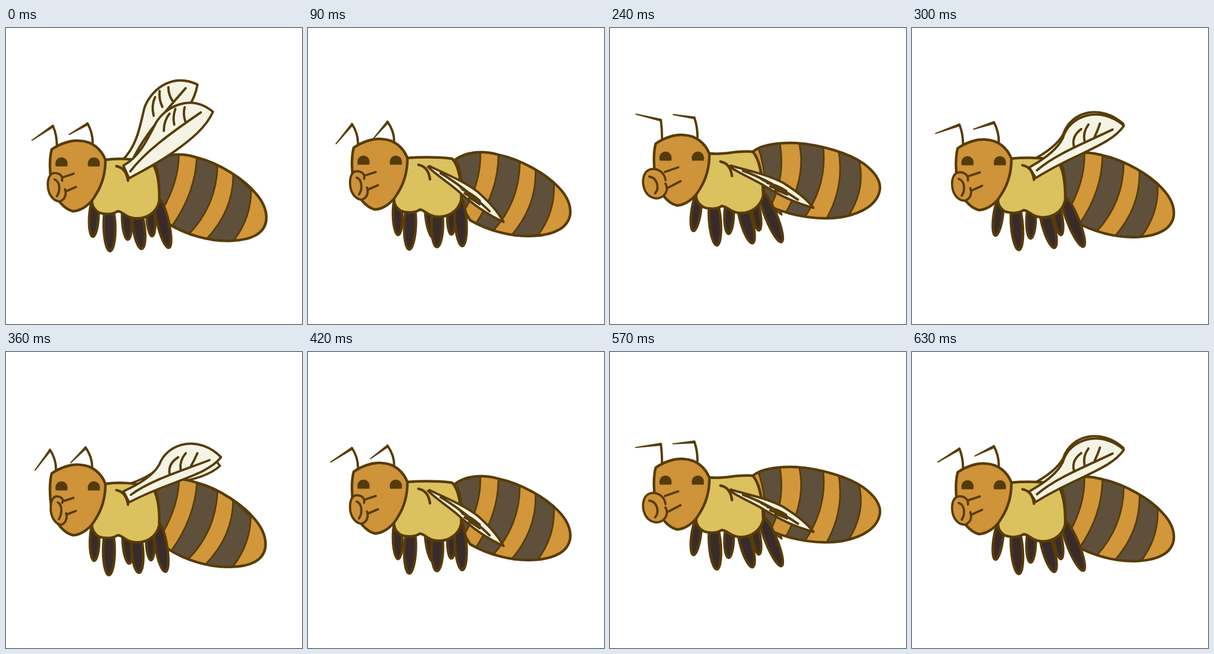
An HTML page with a canvas that plays this animation: 512 px wide and 512 px high, repeating every 660 ms.

```html
<!DOCTYPE html>
<html lang="en">
<head>
<meta charset="utf-8">
<title>Flying bee</title>
<style>
  html, body { margin: 0; height: 100%; overflow: hidden; background: #fff; }
  canvas { display: block; }
</style>
</head>
<body>
<canvas id="stage" width="512" height="512"></canvas>
<script>
const ctx = document.getElementById('stage').getContext('2d');
const LOOP = 660, BEAT = 330, STEP = 30;
const INK = '#573c08', HEAD = '#cf933a', ORANGE = '#d2973a', STRIPE = '#5f503c',
      YELLOW = '#dcc15f', WING = '#f5f4e4', LEG = '#3a2b2b', EYE = '#543c0a';
const RAD = Math.PI / 180;

// Body shapes as [raised, lowered] pairs
const ABDOMEN = [
  'M247,214 C262,202 290,198 322,199 C365,202 412,216 438,234 C457,248 468,262 467,278 C464,304 438,320 402,327 C362,333 318,326 282,311 C264,290 252,250 247,214Z',
  'M256,232 C272,219 300,214 330,224 C370,234 412,262 432,286 C446,302 452,318 450,334 C446,356 424,367 390,368 C352,370 310,357 280,338 C262,310 256,270 256,232Z'
];
const BANDS = [
  'M256,206 Q272,250 266,296 L280,304 Q303,255 294,200Z M326,195 Q342,255 302,323 L335,330 Q378,268 368,200Z M395,210 Q407,275 372,334 L409,330 Q444,280 430,226Z',
  'M256,230 Q270,260 264,312 L272,312 Q300,262 299,215Z M330,222 Q328,285 286,344 L315,358 Q364,308 366,238Z M393,252 Q394,315 346,366 L392,370 Q424,330 424,280Z'
];
const THORAX = [
  'M172,217 C200,220 220,211 247,214 C258,226 264,255 265,290 C260,312 240,321 224,320 C208,319 203,308 193,308 C186,313 172,314 162,310 C151,304 147,294 150,284 L172,217Z',
  'M172,228 C200,224 225,228 250,231 C262,242 266,270 265,300 C260,322 240,331 222,329 C205,328 203,317 193,317 C184,323 170,323 160,319 C150,312 147,302 150,292 L172,228Z'
];
const FACE = 'M79,210 C95,199 113,194 127,195 C150,196 165,210 172,228 C172,252 166,272 155,289 C146,305 131,316 116,317 C100,313 85,296 79,272 C75,250 75,225 79,210Z';
// Snout: [relaxed, stretched]
const SNOUT = [
  'M97,264 C99,254 90,250 82,251 C73,254 71,266 73,279 C76,293 85,300 93,300 C102,297 105,288 102,279 M88,291 C94,282 94,266 84,262 M99,258 L117,252 M105,282 L121,275',
  'M96,273 C94,258 80,251 68,255 C56,260 55,278 60,290 C66,304 80,307 88,303 C98,298 101,288 96,279 M78,296 C86,287 82,269 68,267 M95,259 L118,251 M101,286 L122,275'
];

// Legs: root x, root y, tip x, tip y, half width, swing
const LEGS = [
  [248, 300, 253, 361, 8, 5], [207, 300, 211, 367, 9, -6], [154, 292, 150, 362, 9, -6],
  [178, 300, 180, 387, 11, 5], [224, 303, 235, 383, 11, 12], [261, 292, 282, 381, 11, 15]
];

// Each wing shape is stored relative to the shoulder, turned so the tip lies on the x axis
const SHOULDER = [205, 245], FAR_SHOULDER = [205, 235];
function wing(tipX, tipY, path) {
  const angle = Math.atan2(tipY - SHOULDER[1], tipX - SHOULDER[0]);
  const c = Math.cos(angle), s = Math.sin(angle);
  const local = path.replace(/([\d.]+),([\d.]+)/g, (_, px, py) => {
    const x = px - SHOULDER[0], y = py - SHOULDER[1];
    return `${(x * c + y * s).toFixed(2)},${(y * c - x * s).toFixed(2)}`;
  });
  return { angle, path: local };
}
const up = wing(358, 145, 'M203,238 C232,222 246,190 260,163 C275,138 318,112 358,145 C346,172 320,193 292,213 C266,232 238,246 213,260Z M215,248 C240,215 280,185 337,146 M273,178 Q273,160 283,148 M291,167 Q288,153 293,140 M310,161 Q306,149 309,137');
const level = wing(372, 182, 'M203,241 C232,228 254,214 265,195 C280,155 335,144 372,182 C355,203 325,213 292,226 C265,236 238,247 213,260Z M216,247 C250,222 300,207 352,187 M283,211 Q280,193 298,182 M302,203 Q300,188 311,175 M320,197 Q326,187 331,175');
const down = wing(186, 421, 'M191,235 C188,270 190,290 165,315 C130,345 135,395 186,421 C200,400 207,365 213,330 C215,300 216,260 210,246Z M202,263 C194,295 187,350 181,408 M190,328 Q172,330 163,347 M187,350 Q167,352 158,367 M184,374 Q172,378 163,389');
const edge = wing(352, 311, 'M207,240 C225,252 245,260 262,270 C290,288 320,303 352,311 C335,290 315,278 300,268 C270,252 235,246 209,238Z M230,247 C255,256 285,270 325,297 M272,268 Q290,272 305,282 M277,274 Q292,279 307,286 M286,280 Q296,283 306,288');

const BODY_KEYS = [0, 30, 150, 240, 300, 330];
const WING_KEYS = [0, 30, 90, 150, 240, 300, 330];
const WING_SHAPES = [up, level, edge, down, edge, level, up];
const FEELER_KEYS = [0, 150, 240, 360, 480, 570, 630, 660];

const lerp = (a, b, k) => a + (b - a) * k;

function span(keys, t) {
  let i = 0;
  while (t >= keys[i + 1]) i++;
  return [i, (t - keys[i]) / (keys[i + 1] - keys[i])];
}

function track(keys, values, t) {
  const [i, k] = span(keys, t);
  return lerp(values[i], values[i + 1], k);
}

function blend(a, b, k) {
  const number = /-?\d+(\.\d+)?/g, ends = b.match(number);
  let i = 0;
  return a.replace(number, v => lerp(+v, +ends[i++], k).toFixed(2));
}

function draw(path, fill, width = 4.5) {
  const p = typeof path === 'string' ? new Path2D(path) : path;
  if (fill) { ctx.fillStyle = fill; ctx.fill(p); }
  ctx.lineWidth = width;
  ctx.stroke(p);
}

function drawWing(shoulder, shape, angle, scale = 1) {
  ctx.save();
  ctx.translate(...shoulder);
  ctx.rotate(angle);
  ctx.scale(scale, scale);
  draw(shape, WING, 4);
  ctx.restore();
}

function drawAbdomen(droop) {
  const outline = new Path2D(blend(...ABDOMEN, droop));
  ctx.save();
  ctx.clip(outline);
  ctx.fillStyle = ORANGE;
  ctx.fillRect(0, 0, 512, 512);
  draw(blend(...BANDS, droop), STRIPE, 2.8);
  ctx.restore();
  draw(outline);
}

function drawLeg([rootX, rootY, tipX, tipY, half, reach], swing) {
  const dx = tipX + reach * swing - rootX, dy = tipY - rootY;
  const leg = new Path2D();
  leg.ellipse(rootX + dx / 2, rootY + dy / 2, Math.hypot(dx, dy) / 2 - 1, half - 1,
    Math.atan2(dy, dx), 0, 7);
  draw(leg, LEG);
}

function drawFeeler(baseX, elbowX, elbowY, length, angle) {
  const tipX = elbowX - length * Math.cos(angle * RAD);
  const tipY = elbowY + length * Math.sin(angle * RAD);
  draw(`M${baseX},${elbowY + 34} Q${baseX},${elbowY + 16} ${elbowX},${elbowY}`, null, 4);
  draw(`M${elbowX},${elbowY - 1} L${tipX},${tipY} L${elbowX + 1},${elbowY + 2}Z`, INK, 2);
}

function drawEye(x, open) {
  ctx.save();
  ctx.translate(x, 239.5);
  ctx.scale(1, open);
  ctx.fillStyle = EYE;
  ctx.fill(new Path2D('M-10,0 C-15,-21 15,-21 10,0Z'));
  ctx.restore();
}

function render(now) {
  const t = Math.floor(now % LOOP / STEP) * STEP, beat = t % BEAT;
  const body = values => track(BODY_KEYS, values, beat);
  const flap = values => track(WING_KEYS, values, beat);
  const lift = body([0, 0, -6, -10, -2, 0]);
  const swing = body([0, -.4, -1.6, 1, 1, 0]);
  const elbow = body([0, -5, -5, 7, 1, 0]);
  const open = track([0, 420, 480, 540, 660], [1, 1, .38, 1, 1], t);

  const [i, k] = span(WING_KEYS, beat);
  const from = WING_SHAPES[i], to = WING_SHAPES[i + 1];
  const shape = blend(from.path, to.path, k);
  const angle = lerp(from.angle, to.angle, k) + flap([0, 0, 10, 0, 0, -4.5, 0]) * RAD;
  const farTurn = flap([-14.2, 7.7, 15, -2, 19.5, 2, -14.2]) * RAD;
  const farScale = flap([1.02, .95, .85, 1.03, .79, .98, 1.02]);

  ctx.fillStyle = '#fff';
  ctx.fillRect(0, 0, 512, 512);
  ctx.strokeStyle = INK;
  ctx.lineCap = ctx.lineJoin = 'round';

  drawWing(FAR_SHOULDER, shape, angle + farTurn, farScale);
  drawAbdomen(body([1, 1.09, .5, 0, .84, 1]));

  ctx.save();
  ctx.translate(0, lift);
  LEGS.forEach(leg => drawLeg(leg, swing));
  ctx.restore();

  draw(blend(...THORAX, 1 + lift / 10), YELLOW);

  ctx.save();
  ctx.translate(0, lift);
  drawFeeler(88 + elbow * .3, 81 + elbow, 169, 44,
    track(FEELER_KEYS, [35, 62, -13, 54, 13, 8, 32, 35], t));
  drawFeeler(150 + elbow * .2, 141 + elbow * .7, 165, 37,
    track(FEELER_KEYS, [31, 63, -8, 46, 29, 6, 27, 31], t));
  draw(FACE, HEAD);
  drawEye(96, open);
  drawEye(152, open);
  draw(blend(...SNOUT, body([0, -.35, .3, 1, .2, 0])), HEAD, 3.9);
  ctx.restore();

  drawWing(SHOULDER, shape, angle);
  ctx.save();
  ctx.translate(0, lift * .8);
  draw('M191,239 Q208,242 211,264');
  ctx.restore();

  requestAnimationFrame(render);
}
requestAnimationFrame(render);
</script>
</body>
</html>
```
